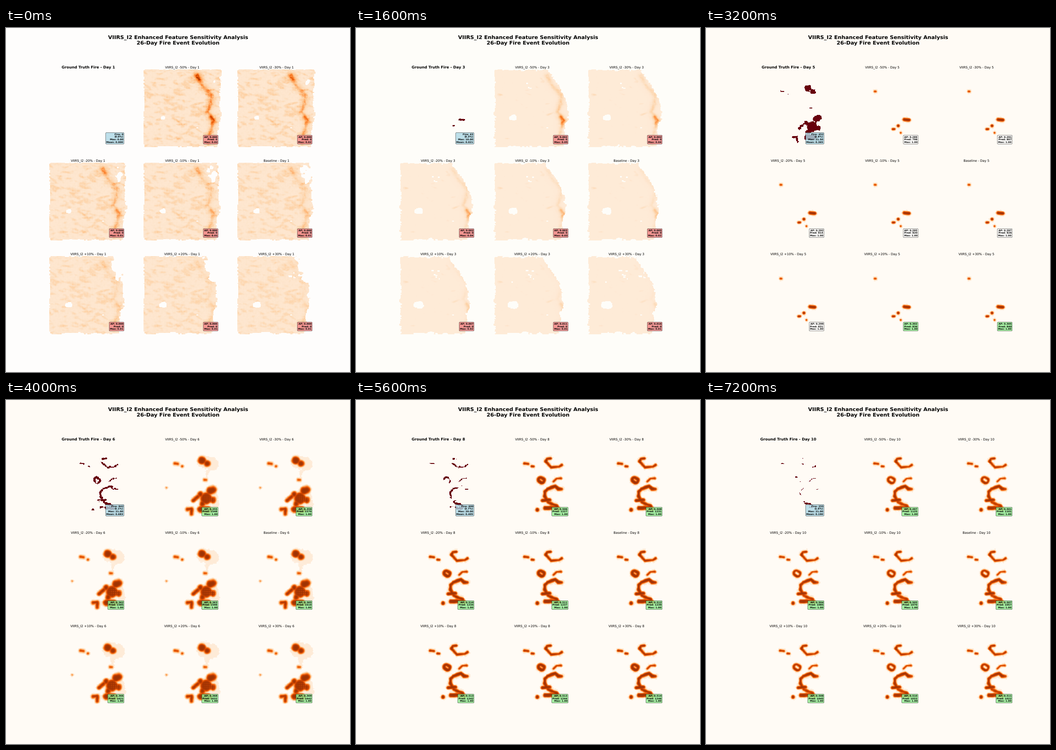
A matplotlib script that plays this animation: 748x748 px, repeating every 8000 ms.

```python
import numpy as np
import matplotlib.pyplot as plt
from matplotlib.animation import FuncAnimation

plt.rcParams["text.hinting"] = "none"

STAGE = 748
N = 128            # grid cells per panel side
SIDE = 169.4       # panel side in pixels
DAYS = 10
CASES = ["Baseline" if p == 0 else f"VIIRS_I2 {p:+d}%"
         for p in (-50, *range(-30, 31, 10))]

axis = (np.arange(N) + 0.5) * SIDE / N
X, Y = np.meshgrid(axis, axis)
ROW, COL = np.indices((N, N))


def noise(seed, long, short, angle=0.0):
    """Gaussian-smoothed random field with unit spread (sizes in cells)."""
    raw = np.random.default_rng(seed).normal(size=(N, N))
    fy, fx = np.meshgrid(np.fft.fftfreq(N), np.fft.fftfreq(N), indexing="ij")
    c, s = np.cos(angle), np.sin(angle)
    a, b = c * fx + s * fy, -s * fx + c * fy
    kernel = np.exp(-2 * np.pi ** 2 * ((a * long) ** 2 + (b * short) ** 2))
    field = np.fft.ifft2(np.fft.fft2(raw) * kernel).real
    return field / field.std()


def distance(points):
    """Distance in pixels from every cell to a polyline x1, y1, x2, y2, ..."""
    pts = np.array(points, float).reshape(-1, 2)
    if len(pts) == 1:
        pts = np.vstack([pts, pts])
    best = np.full((N, N), 1e9)
    for (x1, y1), (x2, y2) in zip(pts[:-1], pts[1:]):
        dx, dy = x2 - x1, y2 - y1
        t = ((X - x1) * dx + (Y - y1) * dy) / (dx * dx + dy * dy + 1e-9)
        t = np.clip(t, 0, 1)
        best = np.minimum(best, np.hypot(X - x1 - t * dx, Y - y1 - t * dy))
    return best


def union(strokes, blend=0.8):
    """Smoothly joined signed distance to strokes (radius, x1, y1, ...)."""
    fields = [-(distance(s[1:]) - s[0]) / blend for s in strokes]
    return -blend * np.logaddexp.reduce(fields, axis=0)


def bump(d, width):
    return np.exp(-(d / width) ** 2)


def step(d, width):
    return 1 / (1 + np.exp(np.clip(d / width, -40, 40)))


def lerp(pair, t):
    return pair[0] + (pair[1] - pair[0]) * t


BROAD = noise(3, 6, 5)
MEDIUM = noise(5, 2.4, 2)
DASH = noise(8, 1.3, 0.5)
FINE = noise(9, 0.8, 0.8)
WISP = np.maximum(noise(11, 3.2, 1.6, 0.35), noise(12, 3.5, 1.4, -0.1))
LATTICE = ((ROW % 4 == 0) | (COL % 4 == 0)).astype(float)

# Fire strokes (radius, x1, y1, x2, y2, ...) in panel pixels:
# first sparks, the big blaze, then the front that it leaves behind
SPARKS = [(1.8, 132, 109.5, 142, 110.5), (1.6, 118.5, 123)]
SPREAD = [(0.8, 68, 49, 70, 49), (0.9, 107, 130.5, 110, 130.5), (0.8, 124, 138)]
BLAZE = [(1, 68, 49, 74, 49.5), (0, 84, 55), (-0.9, 50, 101.5),
         (7, 127, 42), (5.5, 138, 49), (0.6, 132, 84.5, 136, 84.5),
         (6.5, 145, 108, 150, 106), (11, 136, 125), (5, 150, 128),
         (4, 123, 116), (5, 128, 136), (2.2, 108, 129, 118, 120),
         (1.7, 95, 148, 104, 147, 104, 158), (5, 124, 148, 140, 148)]
FRONT = [(1, 67, 49, 75, 49.5), (0.3, 83, 55, 87, 55.5),
         (1, 124, 38, 116, 38.5, 113, 45, 125, 57, 142, 56, 148, 52),
         (6.5, 102, 84, 105, 86), (0.6, 146, 81, 137, 81.5, 130, 88),
         (1.8, 111, 120, 111, 110, 117, 104, 134, 98, 140, 104, 148, 104),
         (1.5, 111, 118, 114, 127), (1.6, 106, 129, 122, 128),
         (2, 118, 133, 138, 141), (2.4, 112, 145, 124, 145, 140, 146),
         (2.2, 95, 149)]

UNBURNT = np.full((N, N), 99.0)
START, GROWN, MASS, LINE = map(union, (SPARKS, SPARKS + SPREAD, BLAZE, FRONT))


def burning(day):
    """Signed distance to the fire; the late front thins and hollows out."""
    if day < 6:
        return {3: START, 4: GROWN, 5: MASS}.get(day, UNBURNT)
    age = day - 6
    return np.maximum(LINE + 0.15 * age, -(LINE + 4.2 - 0.8 * age))


def truth(day):
    gaps = 2 * (0.55 * (day - 8) - 0.4 - MEDIUM) if day > 5 else -9
    d = np.maximum(burning(day) + 0.6 * FINE - 0.3, gaps)
    return np.ma.masked_where(d > 0, np.ones((N, N)))


# Early haze, one value or (first case, last case) pair per day
HAZE = dict(base=(0.125, 0.112, 0.085), gain=(0.62, 0.74, 0.68),
            decay=(0.74, 0.74, 0.79), top=(1, 0.55, 0.1), mid=(0.75, 0.8, 0.3),
            wisp=(0.5, 1.3, 2.2), thin=(0, 0, 1), inset=(0.6, 0.6, 2.5),
            east=((168, 156), (164, 152), (162, 150)),
            corner=((0, 26), (6, 42), (45, 50)),
            span=(52, 52, 80), ease=(1.8, 0.7, 1))
RIDGE = distance([116, 14, 126, 35, 138, 47, 147, 56, 146, 75, 139, 92,
                  151, 113, 147, 129, 143, 145, 141, 168])
STREAKS = np.maximum(bump(distance([64, 107, 74, 113, 86, 122]), 2.4),
                     bump(distance([74, 152, 79, 152]), 3))


def haze(day, k):
    """Low early predictions: pale cover, ridge and wisps."""
    h = {name: values[day - 1] for name, values in HAZE.items()}
    t = k / 7
    mix = t ** h["ease"]
    rough = 1.2 * MEDIUM + 1.0 * DASH
    ragged = 0.3 * h["inset"]
    limit = (lerp(h["east"], mix) - 0.09 * np.maximum(Y - 60, 0)
             + 4 * bump(Y - 108, 20)
             - lerp(h["corner"], mix) * np.clip(1 - Y / h["span"], 0, 1) ** 1.3)
    east = limit - X + rough
    west = X - h["inset"] + ragged * rough
    north = Y - 0.7 * h["inset"] + ragged * rough
    south = (SIDE - Y - 0.6 - (0.4 + 1.6 * t) * np.maximum(BROAD, 0)
             + ragged * rough)
    lake = np.hypot(X - 43, 1.4 * (Y - 106)) - 4 - 4 * t - 1.8 * (day - 1) + MEDIUM
    hole = np.hypot(X - 150, Y - 24) - 2 - 24 * t + 6 * MEDIUM + 3 * BROAD
    thin = h["thin"] * bump(np.hypot((X - 82) / 30, (Y - 42) / 24), 1)
    gaps = 2.6 - (1.5 + 0.3 * t) * thin - 0.6 * DASH - 0.3 * BROAD
    cover = np.minimum.reduce([east, west, north, south, lake, hole, gaps])

    along = (h["top"] * bump(Y - 14, 14) + h["mid"] * (0.35 + 0.6 * bump(Y - 68, 30))
             + 0.75 * bump(Y - 113, 12))
    heat = along * (0.62 * bump(RIDGE, 3.6) + 0.34 * bump(RIDGE, 9))
    value = (h["base"] + h["gain"] * h["decay"] ** k * heat * (1 + 0.2 * MEDIUM)
             + 0.07 * (1 - 0.3 * t) * np.clip(WISP - h["wisp"], 0, 1.6)
             + STREAKS * (0.15 - 0.08 * t) * (day < 3))
    value += (value - 0.08) * 0.12 * (FINE - LATTICE)
    return np.ma.masked_where(cover < 0, value)


PLUME = union([(15, 130, 45, 148, 50), (9, 150, 112, 157, 138),
               (4, 138, 66, 136, 84)])
DOTS = ((ROW % 3 == 0) & (COL % 3 == 0)) * bump(distance([138, 124, 150, 128]), 9)


def burn(day, k):
    """Confident predictions: the previous day's fire, grown and softened."""
    blaze = day == 6
    d = burning(day - 1) - min(2.1, 0.5 * day - 1) + 0.4 * MEDIUM
    value = 0.9 * step(d, 1.3 if blaze else 0.8)
    pale = step(d - 3.5 + 0.7 * FINE, 0.8)
    if blaze:
        pale = np.maximum(pale, step(PLUME - 0.3 * k + DASH, 1))
        value = value - 0.3 * DOTS
    return np.ma.masked_less(np.maximum(value, 0.085 * pale), 0.035)


# Key days of the figures in the boxes; the days between are interpolated
KEY_DAYS = [2, 3, 4, 6, 8, 10]
STATS = dict(cells=[0, 43, 62, 842, 600, 255], high=[0, 10, 22, 21, 20, 21],
             mean=[0, 0.021, 0.048, 0.683, 0.405, 0.190],
             ap_first=[0, 0.002, 0.2236, 0.355, 0.506, 0.497],
             ap_last=[0, 0.016, 0.241, 0.369, 0.514, 0.511],
             pred_first=[0, 0, 47, 1548, 1227, 1125],
             pred_last=[0, 0, 39, 1642, 1246, 1022])
PEAK = {1: (0.020, 0.84), 2: (0.027, 0.865), 3: (0.054, 0.806)}


def figures(day, k):
    s = {name: np.interp(day, KEY_DAYS, v) for name, v in STATS.items()}
    t = k / 7
    ap = lerp((s["ap_first"], s["ap_last"]), t ** np.interp(day, [3, 4, 6], [3, 2, 0.6]))
    pred = lerp((s["pred_first"], s["pred_last"]), t ** 0.75)
    start, ratio = PEAK.get(day, (1, 1))
    return ap, f"AP: {ap:.3f}\nPred: {pred:.0f}\nMax: {start * ratio ** k:.2f}"


def truth_figures(day):
    cells, high, mean = (np.interp(day, KEY_DAYS, STATS[name])
                         for name in ("cells", "high", "mean"))
    return (f"Fire: {cells:.0f}\n({cells / N ** 2:.1%})\n"
            f"Max: {high:.2f}\nMean: {mean:.3f}")


def box_color(ap):
    return "lightgreen" if ap > 0.3 else "white" if ap > 0.1 else "lightcoral"


fig, axes = plt.subplots(3, 3, figsize=(18, 18), dpi=STAGE / 18)
fig.suptitle("VIIRS_I2 Enhanced Feature Sensitivity Analysis\n"
             "26-Day Fire Event Evolution", fontsize=20, fontweight="bold")
axes = axes.ravel()
images, notes = [], []
for i, ax in enumerate(axes):
    ax.axis("off")
    images.append(ax.imshow(np.zeros((N, N)), cmap="Oranges" if i else "Reds",
                            vmin=0, vmax=1,
                            interpolation=None if i else "nearest"))
    notes.append(ax.text(0.95, 0.05, "", transform=ax.transAxes, fontsize=9,
                         fontweight="bold", ha="right", va="bottom",
                         bbox=dict(boxstyle="round,pad=0.3", alpha=0.8,
                                   facecolor="lightblue", edgecolor="black")))

PAPER = ["#fefdfc", "#fefdfb", "#fefdf9", "#fffbf5"]


def draw(frame):
    day = frame + 1
    fig.set_facecolor(PAPER[min(frame, 3)])
    images[0].set_data(truth(day))
    axes[0].set_title(f"Ground Truth Fire - Day {day}", fontsize=14,
                      fontweight="bold", pad=5)
    notes[0].set_text(truth_figures(day))
    for k, case in enumerate(CASES):
        ap, label = figures(day, k)
        images[k + 1].set_data(haze(day, k) if day < 4 else burn(day, k))
        axes[k + 1].set_title(f"{case} - Day {day}", fontsize=12, pad=5)
        notes[k + 1].set_text(label)
        notes[k + 1].get_bbox_patch().set_facecolor(box_color(ap))
    return images + notes


anim = FuncAnimation(fig, draw, frames=DAYS, interval=800, repeat=True,
                     repeat_delay=0, blit=False)
plt.show()
```
